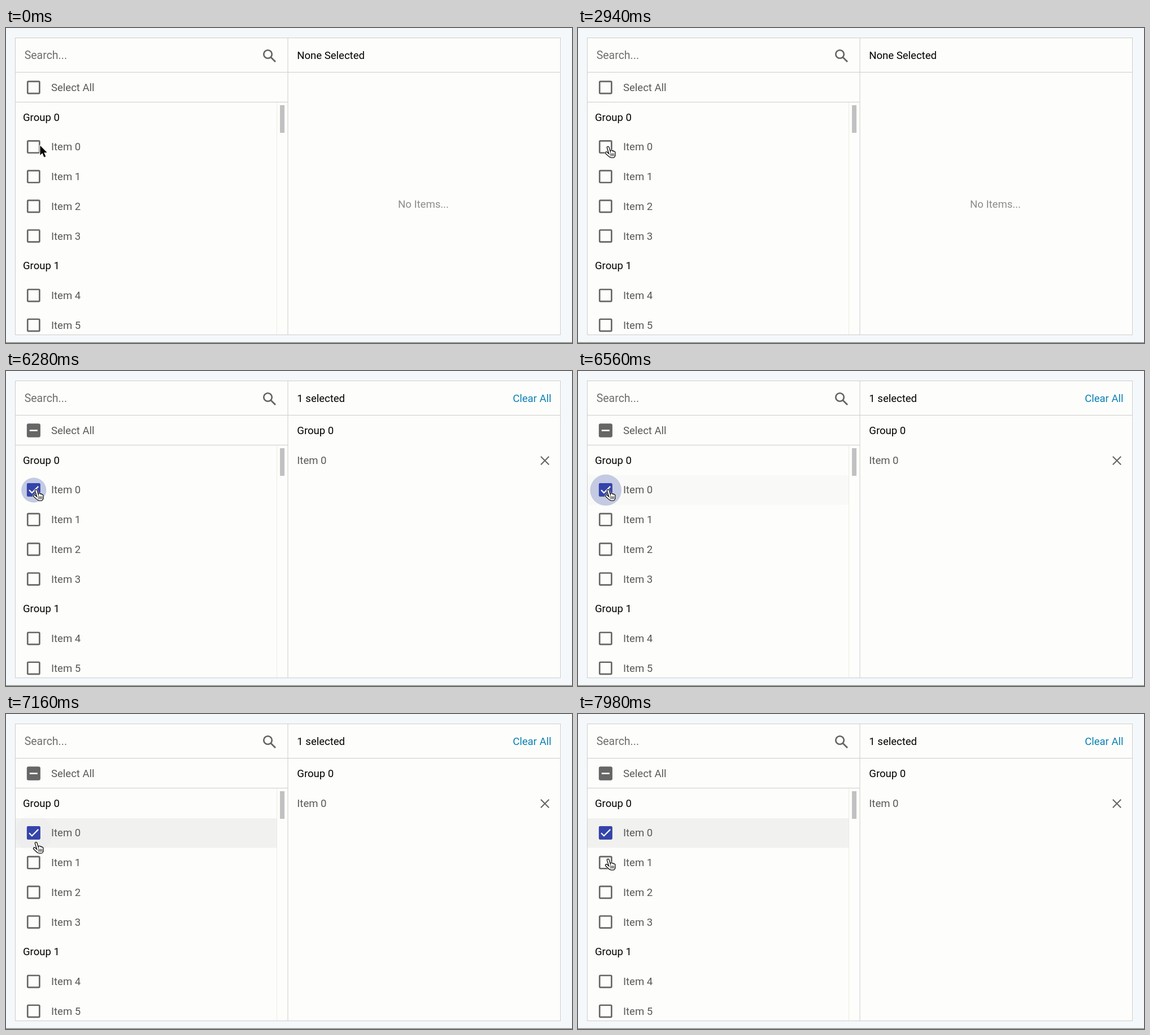
Recreate the animation shown at these times as an HTML page with a canvas. Size 1002 px wide and 559 px high, loop 8 s.

```html
<!DOCTYPE html>
<html lang="en">
<head>
<meta charset="utf-8">
<title>Select list</title>
<style>
html, body { margin: 0; width: 100%; height: 100%; overflow: hidden; background: #f5f8fb; }
canvas { display: block; }
</style>
</head>
<body>
<canvas id="stage" width="1002" height="559"></canvas>
<script>
const ctx = document.getElementById('stage').getContext('2d');
const LOOP = 8000, ROW = 52.72, FIRST = 105.5, BOX = 23.76, BOX_X = 48.8;
const PRESS_AT = 5600, SELECT_AT = 5960;
const LEFT = 80, RIGHT = 515.3, HEAD = 49;
const GREY = '#666666', BLUE = '#3444ab', LINE = '#cdcecb', CARD = '#fdfefb';
const INK = '#000000', SOFT = '#585858';

const arrow = new Path2D('M0 0V17.2L4 13.5L7 20.6L9.9 19.4L6.9 12.5H12.2Z');
const tick = new Path2D('M4.1 12.2L9 17.1L20.3 5.8');
const cross = new Path2D('M-7.2 -7.2L7.2 7.2M7.2 -7.2L-7.2 7.2');
const handle = new Path2D('M13.6 13.6L19.7 19.7');
// index finger, thumb and three folded fingers
const fingers = new Path2D('M5.8 4.2L9.8 17M2.9 13.6L8.8 19M11.7 10.8V18M14.2 11.6V18M16.6 12.8V18');
const palm = new Path2D('M11.8 18.5H14.6');

const ramp = (t, from, to) => Math.max(0, Math.min(1, (t - from) / (to - from)));
const easeOut = (k, power) => 1 - (1 - k) ** power;
const rowMid = i => FIRST + i * ROW;

function rect(x, y, w, h, color) {
  ctx.fillStyle = color;
  ctx.fillRect(x, y, w, h);
}

function text(str, x, mid, color, align = 'left', size = 18.55) {
  ctx.font = size + 'px Roboto, sans-serif';
  ctx.textAlign = align;
  ctx.fillStyle = color;
  ctx.fillText(str, x, mid + 6.4);
}

function at(x, y, draw) {
  ctx.save();
  ctx.translate(x, y);
  draw();
  ctx.restore();
}

function stroke(path, color, width) {
  ctx.strokeStyle = color;
  ctx.lineWidth = width;
  ctx.stroke(path);
}

function disc(x, y, r) {
  const path = new Path2D();
  path.arc(x, y, r, 0, Math.PI * 2);
  return path;
}

function checkbox(mid, fill, amount, mixed) {
  at(BOX_X - BOX / 2, mid - BOX / 2, () => {
    ctx.strokeStyle = GREY;
    ctx.lineWidth = 2.64;
    ctx.beginPath();
    ctx.roundRect(1.32, 1.32, BOX - 2.64, BOX - 2.64, 1.4);
    ctx.stroke();
    if (!amount) return;
    ctx.globalAlpha = amount;
    ctx.fillStyle = fill;
    ctx.beginPath();
    ctx.roundRect(0, 0, BOX, BOX, 2.6);
    ctx.fill();
    if (mixed) rect(4.9, BOX / 2 - 1.3, 14, 2.6, CARD);
    else stroke(tick, CARD, 2.2);
  });
}

function drawPanel() {
  rect(0, 0, 1002, 559, '#f5f8fb');
  rect(0, 557, 1002, 1, '#d3d6d0');
  rect(0, 558, 1002, 1, '#81857b');
  rect(16, 17, 966, 528, LINE);
  rect(17, 18, 964, 526, CARD);
  rect(498.5, 18, 1, 526, LINE);
  rect(17, 78, 964, 1, LINE);
  rect(17, 131, 482, 1, LINE);
  rect(479, 132, 1, 412, '#e9ebe3');
  rect(485, 137, 8, 49, '#c1c1c1');
  text('Search...', 32.7, HEAD, '#6e6e6e', 'left', 19.5);
  at(451, 34, () => {
    ctx.scale(1.32, 1.32);
    stroke(disc(9.5, 9.5, 5.5), '#636363', 2);
    stroke(handle, '#636363', 2.1);
  });
}

function drawRipple(t) {
  const radius = 33 * easeOut(ramp(t, PRESS_AT, PRESS_AT + 1600), 2);
  const alpha = .29 * (1 - ramp(t, 6520, 7200));
  ctx.fillStyle = `rgba(52,72,171,${alpha})`;
  ctx.fill(disc(BOX_X + .4, rowMid(2) + .4, radius));
}

function drawList(t) {
  const amount = ramp(t, SELECT_AT, SELECT_AT + 260);
  checkbox(rowMid(0), GREY, amount, true);
  text('Select All', LEFT, rowMid(0), SOFT);

  rect(17, 185, 462, 52.5, `rgba(241,241,239,${ramp(t, 6420, 6820)})`);
  drawRipple(t);

  let item = 0;
  for (let row = 0; row < 8; row++) {
    const mid = rowMid(row + 1);
    if (row % 5 === 0) {
      text('Group ' + row / 5, 30, mid, INK);
    } else {
      checkbox(mid, BLUE, item ? 0 : amount, false);
      text('Item ' + item++, LEFT, mid, SOFT);
    }
  }
}

function drawChosen(t) {
  if (t < SELECT_AT) {
    text('None Selected', RIGHT, HEAD, INK);
    text('No Items...', 739, 312.8, '#8c8c8c', 'center');
    return;
  }
  text('1 selected', RIGHT, HEAD, INK);
  text('Clear All', 965.6, HEAD, '#0a7fb5', 'right');
  text('Group 0', RIGHT, rowMid(0), INK);
  text('Item 0', RIGHT, rowMid(1), SOFT);
  at(954, 159, () => stroke(cross, '#65685f', 2.1));
}

function drawHand() {
  ctx.lineCap = ctx.lineJoin = 'round';
  const layer = (color, grow) => {
    stroke(fingers, color, 2.4 + grow);
    stroke(palm, color, 5.8 + grow);
  };
  layer('rgba(255,255,255,.8)', 3.8);
  layer('#0a0a0a', 2.6);
  layer('#ffffff', 0);
  for (let i = 0; i < 3; i++) rect(10.2 + i * 2.5, 14.4, 1.1, 5, '#0a0a0a');
}

function drawCursor(t) {
  if (t < 100) {
    at(60.4, 208.6, () => {
      ctx.lineJoin = 'round';
      stroke(arrow, '#ffffff', 2.6);
      ctx.fillStyle = '#050505';
      ctx.fill(arrow);
    });
    return;
  }
  const drift = ramp(t, 1000, 2700);
  const drop = easeOut(ramp(t, 6840, LOOP), 1.4);
  at(52 - 4.6 * drift, 207 + drift + 47 * drop, drawHand);
}

const start = performance.now();
function frame() {
  const t = (performance.now() - start) % LOOP;
  drawPanel();
  drawList(t);
  drawChosen(t);
  drawCursor(t);
  requestAnimationFrame(frame);
}
frame();
</script>
</body>
</html>
```
